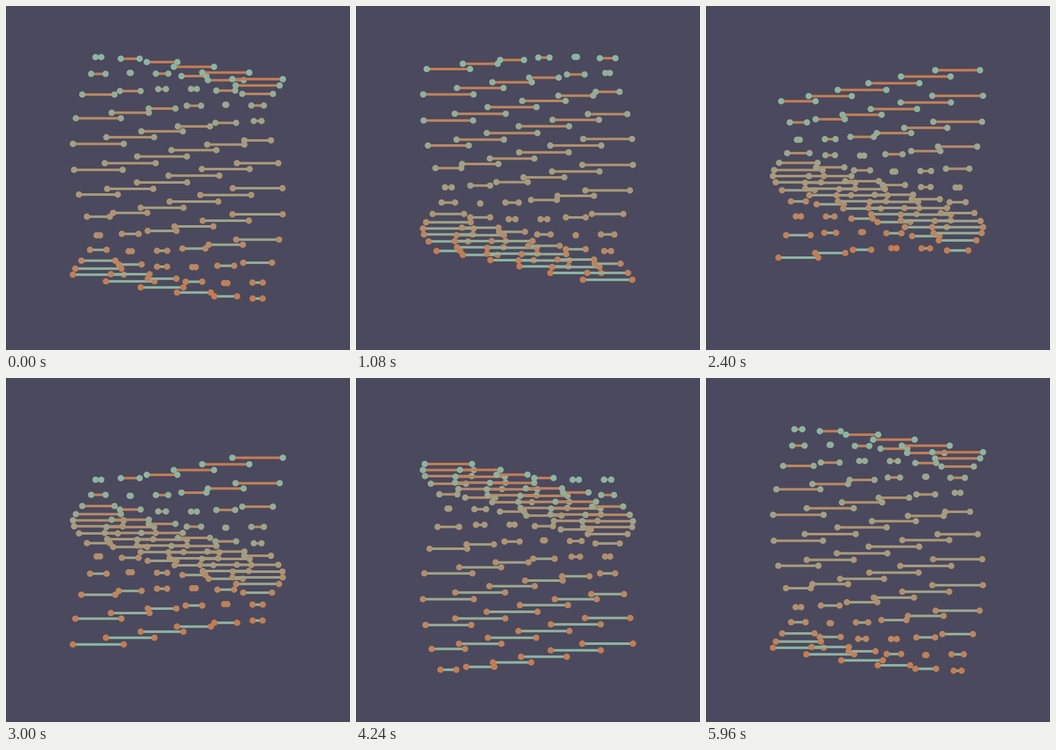
Recreate the animation shown at these times as an HTML page. Size 540 by 540 pixels, loop 6 s.

```html
<!DOCTYPE html>
<html lang="en">
<head>
<meta charset="utf-8">
<title>Turning pairs</title>
<style>
  html, body { margin: 0; width: 100%; height: 100%; overflow: hidden; background: #4b495d; }
  svg { display: block; width: 100%; height: 100%; }
  line { stroke-width: 4; }
</style>
</head>
<body>
<svg id="stage" viewBox="0 0 540 540"></svg>
<script>
const LOOP = 6000, STEP = 40;
const COLS = 6, ROWS = 13, RADIUS = 40, CENTER = 270;
const COL_GAP = 50, ROW_GAP = 25;
const COL_PHASE = -15.23, ROW_PHASE = 22.82, START_PHASE = 92.4; // degrees
const TEAL = [139, 181, 162], ORANGE = [196, 124, 83];

const stage = document.getElementById('stage');

function add(tag, attrs) {
  const node = document.createElementNS('http://www.w3.org/2000/svg', tag);
  set(node, attrs);
  return stage.appendChild(node);
}

function set(node, attrs) {
  for (const name in attrs) node.setAttribute(name, attrs[name]);
}

function mix(from, to, k) {
  return `rgb(${from.map((v, i) => Math.round(v + (to[i] - v) * k)).join(',')})`;
}

const pairs = [];
for (let col = 0; col < COLS; col++) {
  for (let row = 0; row < ROWS; row++) {
    const dx = col - (COLS - 1) / 2, dy = row - (ROWS - 1) / 2;
    const k = row / (ROWS - 1);
    const fill = mix(TEAL, ORANGE, k);
    pairs.push({
      x: CENTER + dx * COL_GAP,
      y: CENTER + dy * ROW_GAP,
      phase: START_PHASE + dx * COL_PHASE + dy * ROW_PHASE,
      bar: add('line', { stroke: mix(ORANGE, TEAL, k) }),
      left: add('circle', { r: 5, fill }),
      right: add('circle', { r: 5, fill })
    });
  }
}

function draw(time) {
  const turn = time / LOOP * 360;
  for (const p of pairs) {
    const angle = (p.phase + turn) * Math.PI / 180;
    const half = RADIUS * Math.sin(angle);
    const y = p.y - RADIUS * Math.cos(angle);
    const x1 = p.x - half, x2 = p.x + half;
    set(p.bar, { x1, x2, y1: y, y2: y });
    set(p.left, { cx: x1, cy: y });
    set(p.right, { cx: x2, cy: y });
  }
}

const start = performance.now();

function tick() {
  const elapsed = performance.now() - start;
  // The motion advances in 40 ms steps; a small lead absorbs refresh delay.
  draw(Math.floor((elapsed + 8) / STEP) * STEP % LOOP);
  requestAnimationFrame(tick);
}
tick();
</script>
</body>
</html>
```
